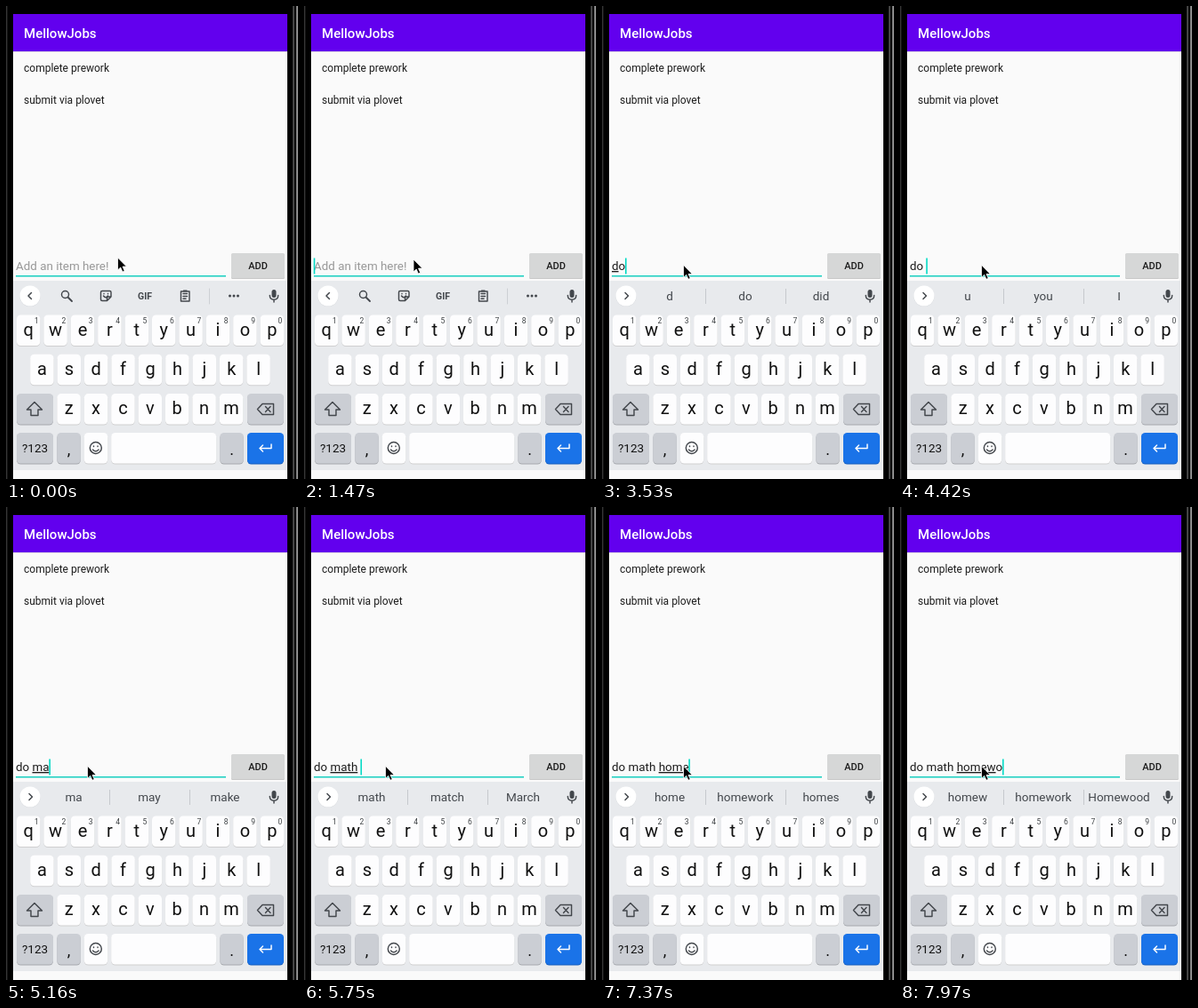
An HTML page that plays this animation: 328 by 532 pixels, repeating every 8 s.

```html
<!DOCTYPE html>
<html lang="en">
<head>
<meta charset="utf-8">
<title>To-do list</title>
<style>
  html, body { margin: 0; width: 100%; height: 100%; overflow: hidden; background: #000; }
  svg { display: block; width: 328px; height: 532px; }
  text { font-family: Roboto, sans-serif; white-space: pre; }
  .mid { text-anchor: middle; }
  .icon { fill: none; stroke: #43474c; stroke-width: 1.45; stroke-linejoin: round; stroke-linecap: round; }
  .field { font-size: 13.4px; }
  .shade { filter: brightness(.82); }
  #word { text-decoration: underline; text-decoration-thickness: 1px; }
</style>
</head>
<body>
<svg viewBox="0 0 328 532">
  <!-- phone and app -->
  <rect width="328" height="532"/>
  <rect width="1.5" height="532" fill="#333"/>
  <rect x="322" width="2" height="532" fill="#444"/>
  <rect x="326" width="2" height="532" fill="#8a8a8a"/>
  <rect x="8" y="9" width="308" height="523" fill="#fafafa"/>
  <rect x="8" y="51" width="308" height="1" fill="#dedee2"/>
  <rect x="8" y="9" width="308" height="42" fill="#6200ee"/>
  <text x="20" y="36" font-size="15" font-weight="500" fill="#fff">MellowJobs</text>
  <g font-size="12" fill="#1c1c1c">
    <text x="20" y="73.5">complete prework</text>
    <text x="20" y="109.5">submit via plovet</text>
  </g>

  <!-- input row -->
  <text id="hint" class="field" x="11" y="297" fill="#989898">Add an item here!</text>
  <text id="typed" class="field" x="11" y="297" fill="#1c1c1c"><tspan id="done"></tspan><tspan id="word"></tspan><tspan id="tail"></tspan></text>
  <rect id="caret" y="283.5" width="1.6" height="18" fill="#03dac5"/>
  <rect x="11" y="303" width="236" height="1.5" fill="#18cfc0"/>
  <rect x="253" y="279" width="60" height="28" rx="1.5" fill="#c8c8c8"/>
  <rect x="253" y="278" width="60" height="28" rx="1.5" fill="#d6d7d7"/>
  <text class="mid" x="283" y="296" font-size="11" font-weight="500" fill="#1c1c1c">ADD</text>

  <!-- keyboard -->
  <rect x="8" y="309" width="308" height="213" fill="#e8eaed"/>
  <circle cx="27" cy="326.6" r="11.5" fill="#d3d6da"/>
  <circle cx="27" cy="326" r="11.5" fill="#fff"/>
  <path id="chevron" class="icon"/>
  <g id="tools" class="icon">
    <circle cx="66.5" cy="324.5" r="4"/>
    <path d="M69.5 327.5L74 332" stroke-width="1.8"/>
    <path d="M108 320.5h8.5q1.5 0 1.5 1.5v5l-4.5 4.5h-5.5q-1.5 0-1.5-1.5v-8q0-1.5 1.5-1.5zM118 327h-3q-1.5 0-1.5 1.5v3M109.5 326q2.5 3.5 5 0M110 323.5v.3M114.5 323.5v.3"/>
    <path d="M196.5 321h9.5v11h-9.5zM199 323.5h4.5M199 326.5h4.5M199 329.3h3M199.5 320.3h3.5"/>
    <path d="M228.5 318v17" style="stroke:#cdd0d4;stroke-width:1"/>
    <g fill="#43474c" stroke="none">
      <circle cx="251.5" cy="326" r="1.5"/><circle cx="256" cy="326" r="1.5"/><circle cx="260.5" cy="326" r="1.5"/>
      <text class="mid" x="156" y="329.7" font-size="10.5" font-weight="700">GIF</text>
    </g>
  </g>
  <g id="words" class="mid" font-size="13.5" fill="#43474c">
    <path d="M116.5 318v17M206.5 318v17" stroke="#c6c9cd"/>
    <text x="76" y="331"></text><text x="161" y="331"></text><text x="246" y="331"></text>
  </g>
  <rect x="298.5" y="319" width="5" height="9" rx="2.5" fill="#43474c"/>
  <path class="icon" d="M296.3 325.5q0 4.7 4.7 4.7t4.7-4.7M301 330.5v2.5"/>

  <g id="keys" class="mid"></g>

  <!-- key symbols -->
  <path class="icon" d="M32 445.5l8.5 8.500h-4.500v6.500h-8v-6.500h-4.500z"/>
  <path class="icon" d="M288 447.500h12.500v12h-12.500l-5.500-6zM291.500 450.500l5.500 6M297 450.500l-5.500 6"/>
  <g class="icon">
    <circle cx="100.800" cy="497" r="6.500"/>
    <path d="M97.500 499q3.300 3.600 6.600 0M98.500 495v.4M103 495v.4"/>
  </g>
  <path class="icon" style="stroke:#fff" d="M298 493v4.500h-13M288.500 494l-3.500 3.500 3.500 3.500"/>

  <path id="mouse" d="M0 0v14l3.200-3 2.200 5 2.300-1-2.200-4.900h4.400z" stroke="#fff" stroke-width=".8"/>
</svg>
<script>
const $ = id => document.getElementById(id);

function add(name, attrs, text = '') {
  const el = document.createElementNS('http://www.w3.org/2000/svg', name);
  for (const k in attrs) el.setAttribute(k, attrs[k]);
  el.textContent = text;
  $('keys').append(el);
}

function key(x, y, width, fill, label = '', size = 20, dy = 23) {
  const box = { x, width, height: 34.5, rx: 4.5, fill };
  add('rect', { ...box, y: y + 1, class: 'shade' });
  add('rect', { ...box, y });
  add('text', { x: x + width / 2, y: y + dy, 'font-size': size, fill: '#111' }, label);
}

const WHITE = '#fdfdfe', GREY = '#cbced4', BLUE = '#1a73e8', PITCH = 30.4;
[['qwertyuiop', 12], ['asdfghjkl', 27.2], ['zxcvbnm', 57.4]].forEach(([row, left], r) => {
  [...row].forEach((c, i) => {
    const x = left + i * PITCH;
    key(x, 347.5 + r * 44.3, 26.4, WHITE, c);
    if (!r) add('text', { x: x + 22.4, y: 356.5, 'font-size': 8.5, fill: '#3c4043' }, (i + 1) % 10);
  });
});
key(12, 436, 41, GREY);
key(271, 436, 41, GREY);
key(12, 480, 41, GREY, '?123', 13.5, 22);
key(57.4, 480, 26.4, GREY, ',', 18, 25);
key(87.8, 480, 26.4, WHITE);
key(118.2, 480, 118, WHITE);
key(240.4, 480, 26.4, GREY, '.', 18, 25);
key(271, 480, 41, BLUE);

// time, finished text, underlined word, text not yet underlined, caret shown, suggestions
const typing = [
  [0, '', '', '', 0, ''],
  [580, '', '', '', 1, ''],
  [1020, '', '', '', 0, ''],
  [1470, '', '', '', 1, ''],
  [2050, '', '', '', 0, ''],
  [2490, '', '', '', 1, ''],
  [3090, '', '', '', 0, ''],
  [3240, '', '', 'd', 1, ''],
  [3530, '', 'd', 'o', 1, 'd do did'],
  [3680, '', 'do', '', 1, "do does don't"],
  [4120, '', 'do', '', 0, "do does don't"],
  [4270, '', 'do', ' ', 1, "do does don't"],
  [4420, 'do ', '', '', 1, 'u you I'],
  [4710, 'do ', '', 'm', 1, 'u you I'],
  [5010, 'do ', 'm', 'a', 1, 'm me my'],
  [5160, 'do ', 'ma', '', 1, 'ma may make'],
  [5300, 'do ', 'ma', 't', 1, 'ma may make'],
  [5450, 'do ', 'mat', 'h', 1, 'mat math made'],
  [5750, 'do ', 'math', ' ', 1, 'math match March'],
  [5890, 'do math ', '', '', 1, 'math match March'],
  [6040, 'do math ', '', '', 1, 'and homework is'],
  [6190, 'do math ', '', '', 0, 'and homework is'],
  [6330, 'do math ', '', 'h', 1, 'and homework is'],
  [6480, 'do math ', 'h', 'o', 1, 'h have he'],
  [6630, 'do math ', 'ho', '', 1, 'ho homework go'],
  [7080, 'do math ', 'ho', 'm', 1, 'ho homework go'],
  [7230, 'do math ', 'hom', 'e', 1, 'hom homework home'],
  [7370, 'do math ', 'home', '', 1, 'home homework homes'],
  [7670, 'do math ', 'home', 'w', 1, 'home homework homes'],
  [7820, 'do math ', 'homew', '', 1, 'homew homework Homewood'],
  [7970, 'do math ', 'homew', 'o', 1, 'homew homework Homewood']
];
const moves = [
  [0, 125.5, 283], [1470, 123, 285], [1620, 113, 292], [1760, 102, 295.5],
  [1910, 96, 294], [2050, 92, 292], [2200, 91.5, 291.3]
];
const at = (steps, t) => steps.findLast(s => s[0] <= t);
const show = (id, on) => $(id).setAttribute('visibility', on ? 'visible' : 'hidden');
const labels = $('words').querySelectorAll('text');
let last;

function draw(now) {
  const t = now % 8000;
  const [, x, y] = at(moves, t);
  $('mouse').setAttribute('transform', `translate(${x} ${y})`);

  const step = at(typing, t);
  if (step !== last) {
    last = step;
    const [, done, word, tail, caret, list] = step;
    $('done').textContent = done;
    $('word').textContent = word;
    $('tail').textContent = tail;
    const typed = done + word + tail;
    $('caret').setAttribute('x', 10.8 + (typed && $('typed').getComputedTextLength()));
    show('caret', caret);
    show('hint', !typed);
    show('tools', !list);
    show('words', list);
    list.split(' ').forEach((s, i) => labels[i].textContent = s);
    $('chevron').setAttribute('d', list ? 'M26 322.5l3.5 3.5-3.5 3.5' : 'M28.5 322.5l-3.5 3.5 3.5 3.5');
  }
  requestAnimationFrame(draw);
}
requestAnimationFrame(draw);
</script>
</body>
</html>
```
